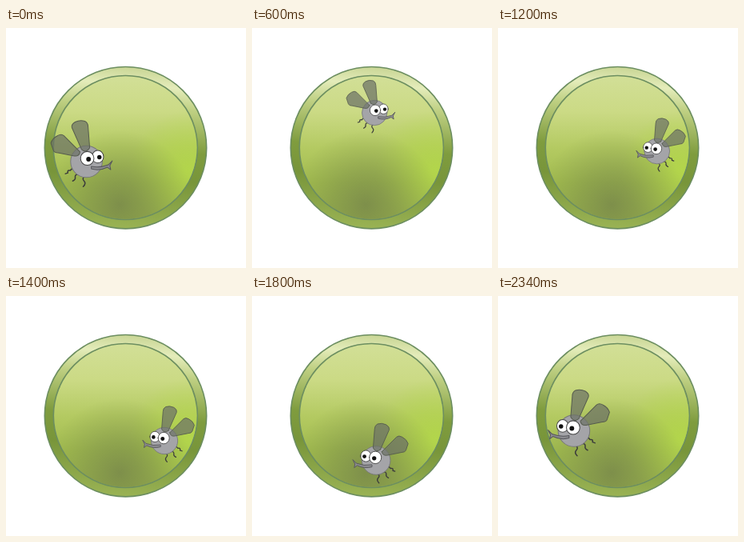
Write an HTML page that moves like this. It is 300 px wide and 300 px high and loops after 2400 ms.

```html
<!DOCTYPE html>
<html lang="en">
<head>
<meta charset="utf-8">
<title>Fly on a button</title>
<style>
html, body { margin: 0; width: 100%; height: 100%; overflow: hidden; background: #fff; }
svg { display: block; width: 100vw; height: 100vh; }
</style>
</head>
<body>
<svg viewBox="0 0 300 300">
  <defs>
    <linearGradient id="rim" x1=".54" y1="0" x2=".46" y2="1">
      <stop offset="0" stop-color="#c8d594"/>
      <stop offset=".11" stop-color="#e4ecba"/>
      <stop offset=".24" stop-color="#bfd083"/>
      <stop offset=".5" stop-color="#7f9c3e"/>
      <stop offset=".68" stop-color="#78953a"/>
      <stop offset="1" stop-color="#9ab354"/>
    </linearGradient>
    <linearGradient id="face" x1=".5" y1="0" x2=".5" y2="1">
      <stop offset="0" stop-color="#d2df97"/>
      <stop offset=".25" stop-color="#cbda85"/>
      <stop offset=".5" stop-color="#b4ca62"/>
      <stop offset=".75" stop-color="#a1bb4e"/>
      <stop offset="1" stop-color="#9ab34c"/>
    </linearGradient>
    <radialGradient id="glow" cx=".95" cy=".66" r=".42">
      <stop offset="0" stop-color="#b4d84a" stop-opacity=".9"/>
      <stop offset="1" stop-color="#b4d84a" stop-opacity="0"/>
    </radialGradient>
    <radialGradient id="shade" cx=".46" cy=".9" r=".52">
      <stop offset="0" stop-color="#78884a" stop-opacity=".85"/>
      <stop offset=".45" stop-color="#7c8e4a" stop-opacity=".5"/>
      <stop offset="1" stop-color="#84984a" stop-opacity="0"/>
    </radialGradient>
  </defs>
  <g stroke="#6c8e60" stroke-width="1.6">
    <circle cx="149.5" cy="149.7" r="101.2" fill="url(#rim)"/>
    <circle cx="149.3" cy="149.5" r="90" fill="url(#face)"/>
    <g stroke="none">
      <circle cx="149.3" cy="149.5" r="89.2" fill="url(#glow)"/>
      <circle cx="149.3" cy="149.5" r="89.2" fill="url(#shade)"/>
    </g>
  </g>
  <g id="fly" stroke-linejoin="round" stroke-linecap="round">
    <g fill="none" stroke="#3c3c3c" stroke-width="1.5">
      <path d="M-15 8Q-18 8 -20 11Q-24 10 -23 14L-26 15"/>
      <path d="M-9 16Q-14 15 -14 19Q-13 22 -17 24"/>
      <path d="M-2 18Q-6 21 -3 24Q0 27 -4 31"/>
    </g>
    <circle r="19.6" fill="#a4a4a8" stroke="#77777b"/>
    <g fill="#6c7266" fill-opacity=".72" stroke="#565c4e" stroke-width="1">
      <path d="M-8 -12L-28 -32Q-31 -35 -36 -32Q-42 -29 -44 -23L-41 -14Q-40 -11 -35 -11L-15 -7Q-9 -6 -8 -12Z"/>
      <path d="M-6 -15L-18 -42Q-19 -46 -14 -49Q-8 -52 -2 -50Q2 -48 2 -43L4 -17Q0 -10 -6 -15Z"/>
    </g>
    <path d="M6 6Q17 8 27 4L32 -1L29 5L30 10L26 7Q16 12 6 9Z" fill="#8b8b8f" stroke="#55555a" stroke-width="1"/>
    <g fill="#fff" stroke="#444" stroke-width="1">
      <ellipse cx="14" cy="-6" rx="7.2" ry="7.8"/>
      <ellipse cx="1" cy="-4" rx="8.3" ry="8.5"/>
    </g>
    <circle cx="16" cy="-5.4" r="2.7" fill="#111"/>
    <circle cx="2.6" cy="-3" r="2.9" fill="#111"/>
  </g>
</svg>
<script>
const LOOP = 2400, STEPS = 36, TURN = STEPS / 2;
const MID = 6.5; // from the middle of the whole fly to its body
const fly = document.getElementById('fly');

// step, x of the fly's middle, y, size
const path = [
  [0, 94, 167, 1.01], [4, 105.5, 131.5, .93], [9, 148, 106, .8],
  [15, 201.5, 129, .79], [18, 204, 154, .81], [21, 203.5, 181, .85],
  [24, 185, 205, .88], [27, 161, 205.5, .91], [32, 119.5, 187, .98],
  [35, 101.5, 168.5, 1.01]
];

// Keys repeat round the loop
function key(i) {
  const n = path.length, lap = Math.floor(i / n), p = path[i - lap * n];
  return [p[0] + lap * STEPS, ...p.slice(1)];
}

function slope(i, k) {
  const a = key(i - 1), b = key(i + 1);
  return (b[k] - a[k]) / (b[0] - a[0]);
}

function along(n, k) {
  let i = 0;
  while (key(i + 1)[0] <= n) i++;
  const a = key(i), b = key(i + 1), d = b[0] - a[0], u = (n - a[0]) / d;
  const ease = u * u * (3 - 2 * u);
  return a[k] + (b[k] - a[k]) * ease +
    d * u * (1 - u) * ((1 - u) * slope(i, k) - u * slope(i + 1, k));
}

// Steps last 60 or 70 ms
function stepAt(t) {
  const n = Math.floor((t + 5) * STEPS / LOOP);
  return Math.round(n * LOOP / STEPS / 10) * 10 > t ? n - 1 : n;
}

function draw(ms) {
  const n = stepAt(ms % LOOP), s = along(n, 3), side = n < TURN ? 1 : -1;
  fly.setAttribute('transform',
    `translate(${along(n, 1)} ${along(n, 2)}) scale(${s * side} ${s}) translate(${MID} 0)`);
}

const start = performance.now();
function tick() {
  draw(performance.now() - start);
  requestAnimationFrame(tick);
}
tick();
</script>
</body>
</html>
```
